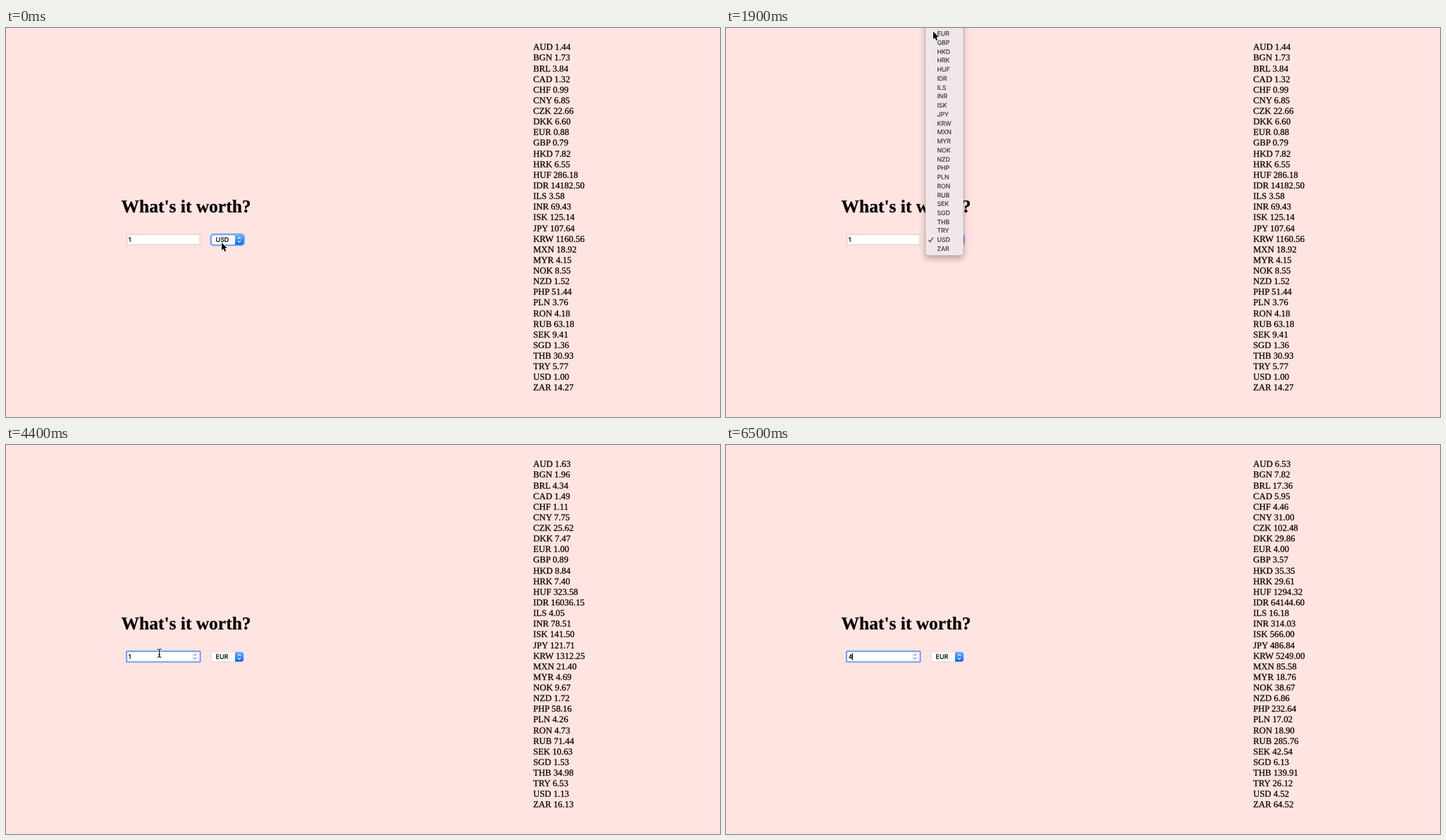
Write an HTML page with a canvas that moves like this. It is 1013 px wide and 553 px high and loops after 6.6 s.

```html
<!DOCTYPE html>
<html lang="en">
<head>
<meta charset="utf-8">
<title>What's it worth?</title>
<style>
html, body { margin: 0; width: 100%; height: 100%; overflow: hidden; background: #ffe4e1; }
canvas { display: block; }
</style>
</head>
<body>
<canvas id="stage" width="1013" height="553"></canvas>
<script>
const ctx = document.getElementById('stage').getContext('2d');
const LOOP = 6600, STEP = 100;
const SERIF = '"Liberation Serif", "Times New Roman", serif';
const SANS = 'Inter, Roboto, sans-serif';
const PITCH = 12.74;

// value of one euro
const RATES = {
  AUD: 1.6325, BGN: 1.9558, BRL: 4.3395, CAD: 1.4885, CHF: 1.1145, CNY: 7.7495,
  CZK: 25.62, DKK: 7.4657, EUR: 1, GBP: 0.8915, HKD: 8.8375, HRK: 7.4025,
  HUF: 323.58, IDR: 16036.15, ILS: 4.0457, INR: 78.5075, ISK: 141.5, JPY: 121.71,
  KRW: 1312.25, MXN: 21.396, MYR: 4.69, NOK: 9.6675, NZD: 1.716, PHP: 58.16,
  PLN: 4.256, RON: 4.7255, RUB: 71.44, SEK: 10.6345, SGD: 1.5325, THB: 34.9775,
  TRY: 6.5293, USD: 1.1307, ZAR: 16.13
};
const CODES = Object.keys(RATES);
const USD = CODES.indexOf('USD');

// time, x, y
const PATH = [
  [0, 306, 305], [300, 306, 305], [600, 300, 258], [700, 300, 258],
  [1200, 291, 56], [1400, 292, 32], [1700, 294, 5], [1900, 294, 5],
  [2400, 295, 2.5], [2500, 295, 2.5], [3000, 225, 262], [3200, 220, 297],
  [3500, 218, 296], [4600, 217.5, 296]
];
const OPEN = 100, PICK = 1900, CLOSED = 2300, CHANGE = 2500;
const HOVER = 3200, FOCUS = 3500, KEYS = [4600, 4900, 5200];

function pointer(t) {
  const i = PATH.findIndex(p => p[0] > t);
  if (i < 1) return PATH[PATH.length - 1].slice(1);
  const [t0, x0, y0] = PATH[i - 1], [t1, x1, y1] = PATH[i];
  const k = (t - t0) / (t1 - t0);
  return [x0 + (x1 - x0) * k, y0 + (y1 - y0) * k];
}

// unhinted glyphs, a hairline stroke gives the heavier desktop smoothing
function text(str, x, y, font, color = '#000', weight = 0.25) {
  ctx.font = font;
  ctx.textRendering = 'geometricPrecision';
  ctx.fillStyle = ctx.strokeStyle = color;
  ctx.fillText(str, x, y);
  ctx.lineWidth = weight;
  ctx.lineJoin = 'round';
  ctx.strokeText(str, x, y);
}

function box(x, y, w, h, r, fill) {
  ctx.beginPath();
  ctx.roundRect(x, y, w, h, r);
  ctx.fillStyle = fill;
  ctx.fill();
}

function line(points, color, width) {
  ctx.beginPath();
  points.forEach(([x, y]) => ctx.lineTo(x, y));
  ctx.strokeStyle = color;
  ctx.lineWidth = width;
  ctx.stroke();
}

function ring(x, y, w, h, r) {
  box(x - 2.2, y - 2.2, w + 4.4, h + 4.4, r + 2.2, 'rgba(90,145,245,0.6)');
  box(x - 1.5, y - 1.5, w + 3, h + 3, r + 1.5, '#6a9cf4');
}

function chevrons(x, y, w, gap, color, width) {
  for (const s of [-1, 1])
    line([[x - w, y + s * gap], [x, y + s * (gap + w)], [x + w, y + s * gap]], color, width);
}

function drawInput(value, focused, spinner, caret) {
  if (focused) ring(172, 294.2, 102.6, 13.2, 0);
  else box(170.8, 293.2, 104.8, 15.2, 0, '#d3c9c8');
  box(172, 294.2, 102.6, 13.2, 0, '#fff');
  text(value, 173.7, 304.2, '8.8px ' + SANS);
  if (caret) {
    ctx.fillStyle = '#000';
    ctx.fillRect(179, 296, 1, 10);
  }
  if (spinner) {
    box(264.5, 295.2, 7, 11.4, 2.5, '#d8d8d8');
    box(265.1, 295.8, 5.8, 10.2, 2, '#fafafa');
    chevrons(268, 300.9, 1.4, 1.8, '#444', 1);
  }
}

function drawSelect(code, focused) {
  if (focused) ring(291.6, 294.2, 45.2, 13.6, 3);
  else box(291.2, 294, 46, 14.4, 3.4, '#d5c8c8');
  box(291.8, 294.4, 45, 13.4, 3, '#fff');
  const g = ctx.createLinearGradient(0, 294, 0, 308);
  g.addColorStop(0, '#6cb3fa');
  g.addColorStop(1, '#0a68f5');
  box(325, 294.2, 12, 13.8, [0, 3, 3, 0], g);
  chevrons(331, 301.1, 2, 1.5, '#fff', 1.1);
  text(code, 297.6, 304.2, '8.8px ' + SANS);
}

function drawMenu(row, alpha) {
  ctx.save();
  ctx.globalAlpha = alpha;
  ctx.shadowColor = 'rgba(60,30,40,0.36)';
  ctx.shadowBlur = 10;
  ctx.shadowOffsetY = 4;
  box(282.8, -120, 54.2, 443.6, 4, '#efe7ea');
  ctx.shadowColor = 'transparent';
  ctx.lineWidth = 0.6;
  ctx.strokeStyle = 'rgba(90,70,80,0.4)';
  ctx.stroke();
  CODES.forEach((code, i) => {
    const y = 301 + (i - USD) * PITCH, on = i === row;
    if (on) {
      ctx.fillStyle = '#3b8cf8';
      ctx.fillRect(282.8, y - PITCH / 2, 54.2, PITCH);
    }
    const ink = on ? '#fff' : '#363336';
    text(code, 299.4, y + 3.2, (on ? '500 ' : '') + '8.8px ' + SANS, ink, 0.15);
    if (i === USD)
      line([[287.4, y + 0.6], [289.6, y + 3], [293.8, y - 3.2]], ink, 1.2);
  });
  ctx.restore();
}

function drawArrow(x, y) {
  ctx.save();
  ctx.translate(x, y);
  ctx.beginPath();
  [[0, 0], [0, 11], [2.5, 8.7], [4.2, 12.8], [6.2, 12], [4.5, 8], [7.9, 8]]
    .forEach(p => ctx.lineTo(...p));
  ctx.closePath();
  ctx.lineJoin = 'round';
  ctx.strokeStyle = '#fff';
  ctx.lineWidth = 1.6;
  ctx.stroke();
  ctx.fillStyle = '#000';
  ctx.fill();
  ctx.restore();
}

function drawBeam(x, y) {
  for (const [color, w] of [['rgba(255,255,255,0.8)', 2.4], ['#111', 1.2]]) {
    line([[x, y - 5], [x, y + 5]], color, w);
    for (const s of [-1, 1])
      line([[x - 2.8, y + s * 6], [x, y + s * 5], [x + 2.8, y + s * 6]], color, w);
    line([[x - 1.4, y + 2], [x + 1.4, y + 2]], color, w);
  }
}

function draw(t) {
  const amount = 1 + KEYS.filter(k => t >= k).length;
  const code = t < CHANGE ? 'USD' : 'EUR';
  const focused = t >= FOCUS;
  const typed = t >= KEYS[0];
  const since = t - Math.max(FOCUS, ...KEYS.filter(k => k <= t));
  const [x, y] = pointer(t);

  ctx.fillStyle = '#ffe4e1';
  ctx.fillRect(0, 0, 1013, 553);
  text("What's it worth?", 163.6, 262.3, 'bold 25.48px ' + SERIF);
  CODES.forEach((c, i) => {
    const value = (amount * RATES[c] / RATES[code]).toFixed(2);
    text(c + ' ' + value, 748, 31.3 + i * 15.13, '12.74px ' + SERIF);
  });
  drawInput(String(amount), focused, t >= HOVER, focused && since % 1000 < 500);
  drawSelect(code, !focused);

  if (t >= OPEN && t < CLOSED) {
    const row = t === PICK ? -1 : USD + Math.round((y - 301) / PITCH);
    drawMenu(row, t <= PICK + 100 ? 1 : (CLOSED - t) / 300);
  }
  if (typed) return;
  const overText = t > CHANGE && ((y > 240 && y < 269) || (y > 293 && y < 309));
  (overText ? drawBeam : drawArrow)(x, y);
}

function tick() {
  const t = performance.now() % LOOP;
  draw(Math.floor(t / STEP) * STEP);
  requestAnimationFrame(tick);
}
tick();
</script>
</body>
</html>
```
